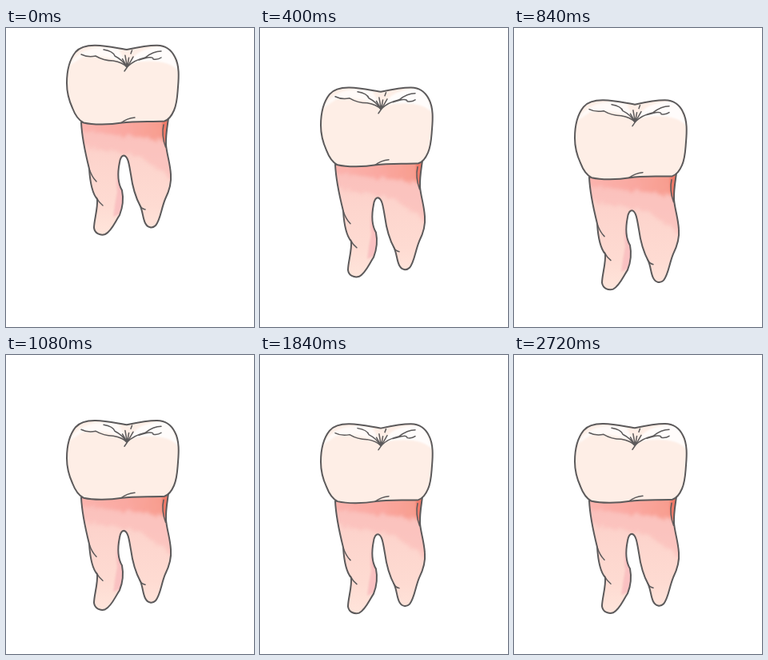
Write an HTML page that moves like this. It is 310 by 374 pixels and loops after 2.76 s.

```html
<!DOCTYPE html>
<html lang="en">
<head>
<meta charset="utf-8">
<title>Bouncing tooth</title>
<style>
  html, body { margin: 0; width: 100%; height: 100%; overflow: hidden; background: #fff; }
  svg { display: block; width: 100%; height: 100%; }
  .ink { fill: none; stroke: #5c5a5b; stroke-width: 2; stroke-linecap: round; stroke-linejoin: round; }
  .thin { stroke-width: 1.5; }
</style>
</head>
<body>
<svg viewBox="0 0 310 374">
  <defs>
    <linearGradient id="gum" x1="0" y1="0" x2="0" y2="1">
      <stop offset="0" stop-color="#fcccc6"/>
      <stop offset=".45" stop-color="#fdd6ce"/>
      <stop offset=".75" stop-color="#fedbd2"/>
      <stop offset="1" stop-color="#ffe5db"/>
    </linearGradient>
    <linearGradient id="flush" x1="0" y1="0" x2="1" y2="0">
      <stop offset="0" stop-color="#fbb0aa"/>
      <stop offset=".5" stop-color="#fa9f97"/>
      <stop offset="1" stop-color="#f58a76"/>
    </linearGradient>
    <filter id="wash" x="-20%" y="-30%" width="140%" height="160%">
      <feTurbulence type="fractalNoise" baseFrequency=".12" numOctaves="3" seed="4"/>
      <feDisplacementMap in="SourceGraphic" scale="12" xChannelSelector="R" yChannelSelector="G"/>
      <feGaussianBlur stdDeviation="2"/>
    </filter>
    <filter id="edge" x="-30%" y="-30%" width="160%" height="160%"><feGaussianBlur stdDeviation="1.2"/></filter>
    <path id="crown" d="M76 69C76 52 79 40 87 30C93 23 102 21.5 112 21.7C126 22 138 25 151 27C165 24 178 21.5 189 21.7
      C201 22 207 28 211 36C217 47 216 62 215 74C214 86 214 94 210 103C207 110 203 115 198 116.5
      C180 117.5 160 116 145 118.5C128 121.5 108 121 97 118.5C90 115 86 108 83 100C78 89 76 80 76 69Z"/>
    <path id="root" d="M94 118C95 140 100 160 104 176C105 192 107 206 114 214C115 226 110 240 110 250C111 257 118 260 124 258
      C132 254 136 243 142 234C146 224 147 213 145 203C139 193 140 178 142 168C143 162 145 159.5 147.5 159.5
      C153 161 154 172 156 183C158 198 162 212 168 223C171 230 171 238 174 244C177 250 183 251 187 247
      C193 240 194 226 199 214C204 204 207 194 206 183C205 168 201 158 200 146C199.5 134 201.5 124 203 113Z"/>
    <clipPath id="inRoot"><use href="#root"/></clipPath>
    <clipPath id="inCrown"><use href="#crown"/></clipPath>
  </defs>
  <g id="tooth">
    <use href="#root" fill="url(#gum)"/>
    <g clip-path="url(#inRoot)">
      <path d="M90 110H212V194Q190 172 164 160Q130 156 90 146Z" fill="#fbb9b6" opacity=".6" filter="url(#wash)"/>
      <path d="M90 108H212V142Q160 138 90 127Z" fill="url(#flush)" opacity=".75" filter="url(#wash)"/>
      <path d="M196 112H205L200 148Q193 132 196 112Z" fill="#ee7564" opacity=".85" filter="url(#edge)"/>
      <path d="M143 162Q136 187 139 205Q136 220 134 236L144 232L150 212Z" fill="#f8b9bc" opacity=".75" filter="url(#edge)"/>
    </g>
    <use href="#root" class="ink"/>
    <path class="ink thin" d="M104 176Q107 186 113 192M113 212Q116 218 121 222M167 221Q169 226 174 227M197 121Q194 134 199.5 149"/>
    <use href="#crown" fill="#feeee6"/>
    <g clip-path="url(#inCrown)" fill="#fff" filter="url(#edge)">
      <path d="M78 48Q94 18 140 25L150 44Q118 32 96 36Z" opacity=".7"/>
      <path d="M155 44Q164 22 205 23L216 54Q200 36 155 44Z" opacity=".85"/>
    </g>
    <use href="#crown" class="ink"/>
    <path class="ink thin" d="M94 33Q102 37 112 35Q122 41 134 41Q146 43 151 49M122 27Q134 29 136 35Q146 40 151 49
      M151 49Q160 40 174 37Q184 29 194 29M166 40Q184 34 184 39Q190 40 194 37M157.5 28L156 32M144 118.5Q151 113 161 112"/>
    <path id="fan" class="ink thin"/>
  </g>
</svg>
<script>
const $ = id => document.getElementById(id);

// Short creases spreading from the pit of the crown
const PIT = [151.5, 49];
let fan = `M${PIT}l-3.5 5`;
for (let i = 0; i < 4; i++) {
  const a = (-120 + 20 * i) * Math.PI / 180;
  const len = 12 + 3 * (i % 2);
  fan += `M${PIT}l${len * Math.cos(a)} ${len * Math.sin(a)}`;
}
$('fan').setAttribute('d', fan);

const LOOP = 2760, STEP = 40;
const DROP = 64, FALL = 0.12;          // px, s
const SWING = 0.1 * DROP / FALL;       // overshoot follows the landing speed

function offset(t) {
  if (t < FALL) return DROP * t / FALL;
  const s = t - FALL;
  return DROP + SWING * Math.sin(4 * Math.PI * s) * Math.exp(-2 * s);
}

const start = performance.now();
function draw(now) {
  const ms = Math.max(0, now - start) % LOOP;
  const t = Math.floor(ms / STEP) * STEP / 1000;
  $('tooth').setAttribute('transform', `translate(0 ${offset(t).toFixed(2)})`);
  requestAnimationFrame(draw);
}
draw(start);
</script>
</body>
</html>
```
